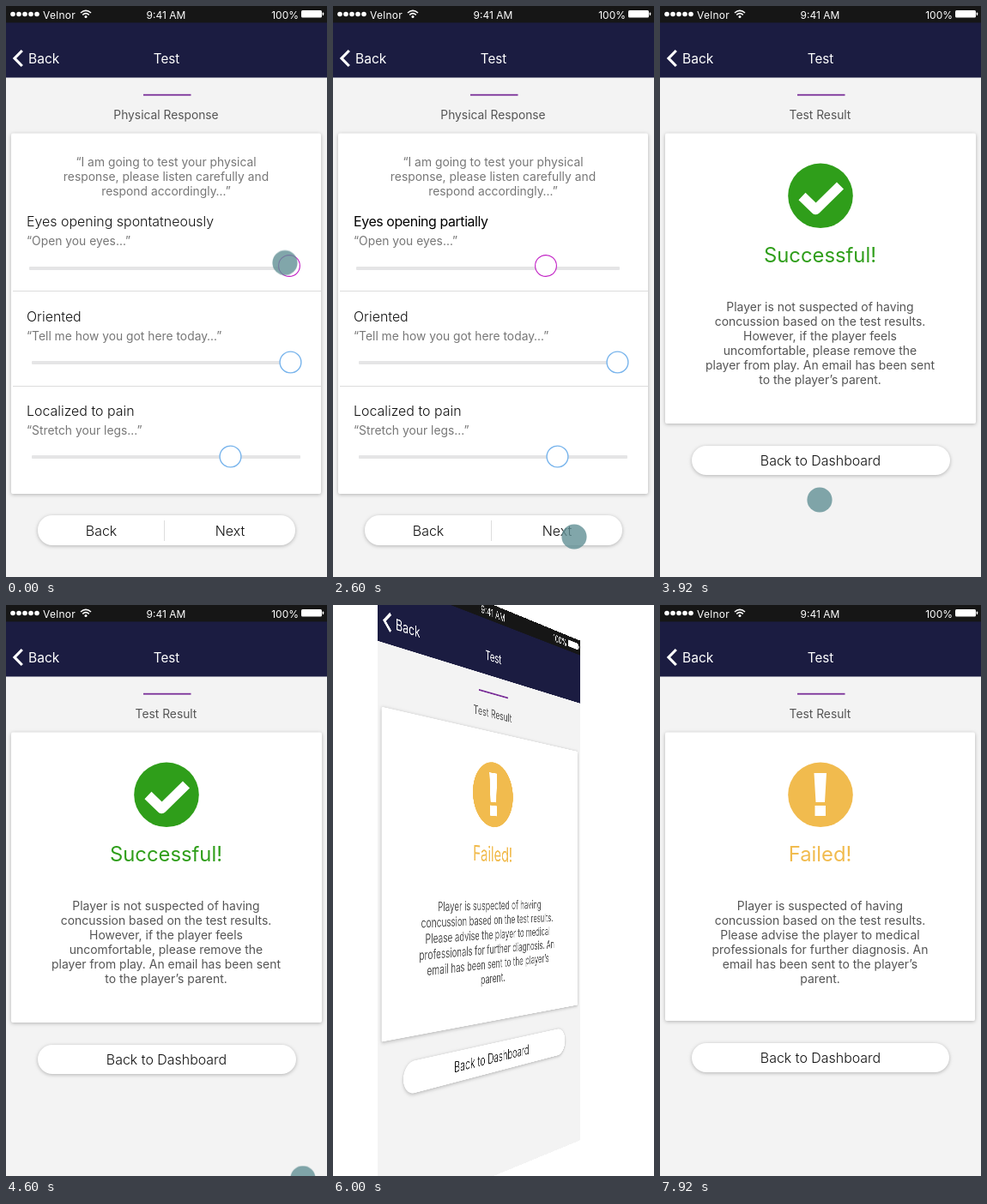
Recreate the animation shown at these times as an HTML page. Size 374 px wide and 666 px high, loop 8040 ms.

```html
<!DOCTYPE html>
<html lang="en">
<head>
<meta charset="utf-8">
<title>Test flow</title>
<style>
  html, body { margin: 0; width: 100%; height: 100%; overflow: hidden; background: #fff; }
  #stage { position: absolute; inset: 0; width: 374px; height: 666px; overflow: hidden; perspective: 1020px; }
  svg { position: absolute; left: 0; top: 0; width: 374px; height: 666px; backface-visibility: hidden; }
  text { font-family: Inter, Roboto, sans-serif; white-space: pre; }
  .raised { fill: #fff; filter: drop-shadow(0 1px 2px #0004); }
  .light { font-weight: 300; }
  .changed { font-weight: 400; fill: #000; letter-spacing: -.42px; }
</style>
</head>
<body>
<div id="stage"></div>
<script>
const LOOP = 8040, WIDTH = 374;
const GREEN = '#2f9e1a', AMBER = '#f1bb4e', BLUE = '#78b4ec', MAGENTA = '#c01cc4';

// Markup helpers
const text = (x, y, size, fill, str, anchor = 'start', extra = '') =>
  `<text x="${x}" y="${y}" font-size="${size}" fill="${fill}" text-anchor="${anchor}" ${extra}>${str}</text>`;
const rect = (x, y, w, h, fill, r = 0, extra = '') =>
  `<rect x="${x}" y="${y}" width="${w}" height="${h}" rx="${r}" fill="${fill}" ${extra}/>`;
const circle = (x, y, r, fill, extra = '') =>
  `<circle cx="${x}" cy="${y}" r="${r}" fill="${fill}" ${extra}/>`;
const stroke = (d, color, width, extra = '') =>
  `<path d="${d}" fill="none" stroke="${color}" stroke-width="${width}" ${extra}/>`;
const lines = (x, y, size, fill, rows) =>
  rows.map((row, i) => text(x, y + i * 17, size, fill, row, 'middle')).join('');
const label = (x, y, str, anchor, extra = '') =>
  text(x, y, 15.95, '#111', str, anchor, `class="light" ${extra}`);
const raised = (x, y, w, h, r) => rect(x, y, w, h, '#fff', r, 'class="raised"');

const header = title =>
  rect(0, 0, WIDTH, 666, '#f3f3f3') +
  rect(0, 0, WIDTH, 83.5, '#1b1c41') +
  rect(0, 0, WIDTH, 19.4, '#161616') +
  [8, 15, 22, 29, 36].map(x => circle(x, 9.5, 2.8, '#fff')).join('') +
  text(43, 14.5, 12, '#fff', 'Velnor', 'start', 'letter-spacing=".3"') +
  stroke('M87 8 Q93 2.6 99 8 M89.2 10.4 Q93 7 96.8 10.4', '#fff', 1.6) +
  circle(93, 12.6, 1.5, '#fff') +
  text(186.5, 14.5, 12, '#fff', '9:41 AM', 'middle') +
  text(341, 14.5, 12, '#fff', '100%', 'end') +
  rect(344, 5, 24, 8.5, '#fff', 1.5) + rect(368.7, 7.5, 1.5, 3.5, '#fff', .7) +
  stroke('M18.8 52 L10 61 L18.8 70', '#fff', 3.2) +
  text(26, 66.5, 15.6, '#fff', 'Back') +
  text(187, 66.5, 15.2, '#fff', 'Test', 'middle') +
  rect(160, 102.8, 55.5, 1.8, '#7a2f98') +
  text(186.5, 132, 13.8, '#555', title, 'middle');

const slider = (y, x0, x1, thumbX, thumbY, color, width, id = '') =>
  rect(x0, y - 2, x1 - x0, 4, '#e5e5e6', 1) +
  circle(thumbX, thumbY, 12.4, '#fff', `stroke="${color}" stroke-width="${width}" ${id}`);

const question = (y, title, prompt, id = '') =>
  label(24, y, title, 'start', id) + text(24, y + 22, 13.85, '#777', prompt);

const quiz = header('Physical Response') +
  raised(6, 148.5, 361, 420.5, 2) +
  lines(186.5, 187, 13.85, '#777', [
    '“I am going to test your physical',
    'response, please listen carefully and',
    'respond accordingly…”']) +
  question(257, 'Eyes opening spontatneously', '“Open you eyes…”', 'id="answer"') +
  question(368, 'Oriented', '“Tell me how you got here today…”') +
  question(478, 'Localized to pain', '“Stretch your legs…”') +
  rect(8, 332, 359, 1, '#dcdcdc') + rect(8, 443, 359, 1, '#dcdcdc') +
  slider(306, 27, 334, 330, 303, MAGENTA, 1.1, 'id="thumb"') +
  slider(416, 30, 343, 331.5, 415.5, BLUE, 1.4) +
  slider(526, 30, 343, 261.5, 525.5, BLUE, 1.4) +
  raised(37, 594, 300, 35, 17) +
  rect(184, 600, 1, 24, '#ddd') +
  label(111, 618, 'Back', 'middle') + label(261, 618, 'Next', 'middle');

const result = (color, verdict, icon, cardEnd, right, rows) => header('Test Result') +
  raised(6, 148.5, right - 6, cardEnd - 148.5, 2) +
  circle(187, 221.3, 37.8, color) + icon +
  text(186.5, 299, 23.8, color, verdict, 'middle') +
  lines(186.5, 355.7, 13.95, '#555', rows) +
  raised(37, cardEnd + 26, right - 67, 34, 17) +
  label(187, cardEnd + 49, 'Back to Dashboard', 'middle');

const success = result(GREEN, 'Successful!',
  stroke('M165.5 222 L181.5 237.5 L210 209.5', '#fff', 11.5, 'stroke-linejoin="round"'), 487, 368, [
    'Player is not suspected of having',
    'concussion based on the test results.',
    'However, if the player feels',
    'uncomfortable, please remove the',
    'player from play. An email has been sent',
    'to the player’s parent.']);

const failure = result(AMBER, 'Failed!',
  '<path d="M179.5 196 H194 L192 230 H181.5 Z M180.5 234 H193 V246 H180.5 Z" fill="#fff"/>', 485, 367, [
    'Player is suspected of having',
    'concussion based on the test results.',
    'Please advise the player to medical',
    'professionals for further diagnosis. An',
    'email has been sent to the player’s',
    'parent.']);

const pointer = '<g id="pointer">' + circle(0, 0, 14.6, 'rgb(98,144,149)', 'opacity=".8"') +
  circle(0, 0, 28.7, 'none', 'id="ring" stroke="#000" stroke-width="3"') + '</g>';

const stage = document.getElementById('stage');
stage.innerHTML = [quiz, success, failure, pointer].map(s => `<svg viewBox="0 0 374 666">${s}</svg>`).join('');
const [quizPage, successPage, failurePage] = stage.children;
const el = id => document.getElementById(id);
const answer = el('answer'), thumb = el('thumb'), cursor = el('pointer'), ring = el('ring');

// Motion
const ease = p => p < .5 ? 4 * p ** 3 : 1 - 4 * (1 - p) ** 3;
const progress = (t, from, to) => ease(Math.min(1, Math.max(0, (t - from) / (to - from))));
const between = (t, from, to) => t >= from && t < to;

const path = [ // time, x, y
  [0, 325, 299.5], [840, 325, 299.5], [1340, 242, 298], [1680, 242, 298], [2300, 283, 625],
  [2520, 283, 625], [2600, 281, 619], [2920, 281, 619], [3900, 186, 576],
  [4240, 186, 576], [4840, 400, 700]];

function cursorAt(t) {
  let [, x, y] = path[0];
  for (let i = 1; i < path.length; i++) {
    const p = progress(t, path[i - 1][0], path[i][0]);
    x += (path[i][1] - path[i - 1][1]) * p;
    y += (path[i][2] - path[i - 1][2]) * p;
  }
  return [x, y];
}

function draw(t) {
  const changed = t >= 1400;
  answer.textContent = changed ? 'Eyes opening partially' : 'Eyes opening spontatneously';
  answer.setAttribute('class', changed ? 'changed' : 'light');
  thumb.setAttribute('cx', 330 - 82 * progress(t, 840, 1340));

  cursor.setAttribute('transform', `translate(${cursorAt(t)})`);
  ring.style.display = between(t, 440, 1420) || between(t, 2300, 2540) ? '' : 'none';

  const push = progress(t, 3200, 3600), flip = progress(t, 5700, 6215);
  quizPage.style.display = push < 1 ? '' : 'none';
  quizPage.style.transform = `translateX(${-WIDTH * push}px)`;
  successPage.style.display = push > 0 && flip < .5 ? '' : 'none';
  successPage.style.transform = flip > 0
    ? `rotateY(${-180 * flip}deg)` : `translateX(${WIDTH * (1 - push)}px)`;
  failurePage.style.display = flip >= .5 ? '' : 'none';
  failurePage.style.transform = flip < 1 ? `rotateY(${180 * (1 - flip)}deg)` : 'none';
}

const start = performance.now();
function tick() {
  draw((performance.now() - start) % LOOP);
  requestAnimationFrame(tick);
}
tick();
</script>
</body>
</html>
```
